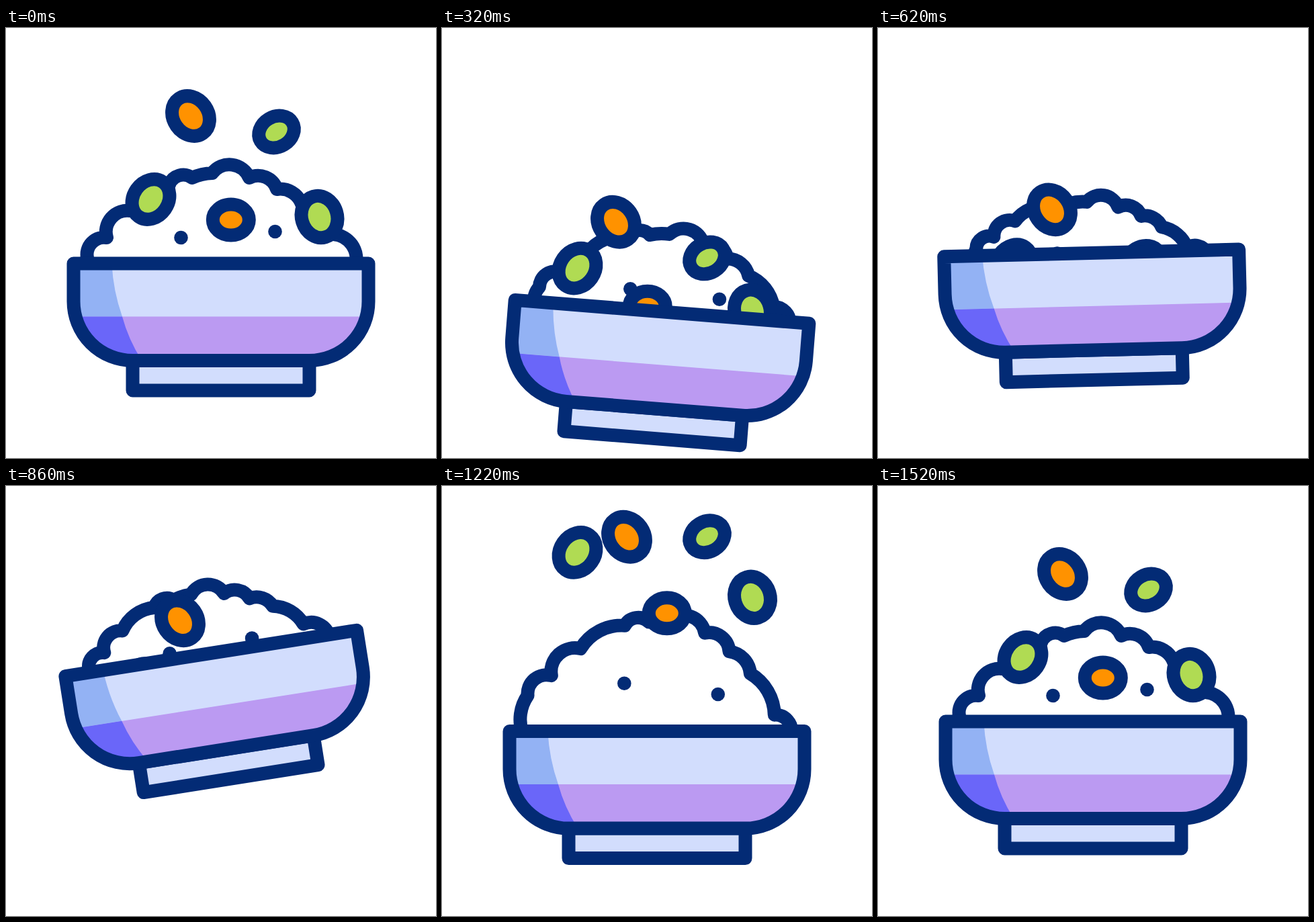
An HTML page that plays this animation: 640x640 px, repeating every 1.7 s.

```html
<!DOCTYPE html>
<html lang="en">
<head>
<meta charset="utf-8">
<title>Rice bowl</title>
<style>
  html, body { margin: 0; width: 100%; height: 100%; overflow: hidden; background: #fff; }
  svg { display: block; width: 100vw; height: 100vh; }
  .line { stroke: #032b75; stroke-width: 20; stroke-linejoin: round; stroke-linecap: round; }
</style>
</head>
<body>
<svg viewBox="0 0 640 640">
  <defs>
    <path id="body" d="M100.5 350.5H539.5V407A88 88 0 0 1 451.5 495H188.5A88 88 0 0 1 100.5 407Z"/>
    <clipPath id="inside"><use href="#body"/></clipPath>
  </defs>
  <path id="rice" class="line" fill="#fff"/>
  <g id="bits"></g>
  <g id="bowl">
    <path class="line" fill="#d2ddfd" d="M188.5 495H451.5V539.5H188.5Z"/>
    <g clip-path="url(#inside)">
      <path fill="#d2ddfd" d="M90 340H550V505H90Z"/>
      <path fill="#bb9af2" d="M90 429.5H550V505H90Z"/>
      <path fill="#93b2f4" d="M90 340H157Q158 387 173 429.5H90Z"/>
      <path fill="#6a66f9" d="M90 429.5H173Q182 463 202 495H90Z"/>
    </g>
    <use href="#body" class="line" fill="none"/>
  </g>
</svg>
<script>
const LOOP = 1700, END = 1520, CX = 320, RIM = 350, PIVOT = 445.5;
const $ = id => document.getElementById(id);

// Monotone cubic track through (times, values): flat at turning points.
function track(times, values) {
  const step = times.slice(1).map((t, i) => (values[i + 1] - values[i]) / (t - times[i]));
  const slope = values.map((_, i) => {
    const a = step[i - 1], b = step[i];
    return a * b > 0 ? 2 * a * b / (a + b) : 0;
  });
  const last = times.length - 1;
  return t => {
    if (t >= times[last]) return values[last];
    let i = 0;
    while (t >= times[i + 1]) i++;
    const h = times[i + 1] - times[i], u = (t - times[i]) / h, v = 1 - u;
    return v * v * ((1 + 2 * u) * values[i] + u * h * slope[i]) +
           u * u * ((3 - 2 * u) * values[i + 1] - v * h * slope[i + 1]);
  };
}

function spin(x, y, deg) {
  const a = deg * Math.PI / 180, c = Math.cos(a), s = Math.sin(a);
  return [x * c - y * s, x * s + y * c];
}

// Bowl
const lift = track([0, 365, 450, 800, 1172, 1380], [0, 74.5, 74.5, -112, 17, 0]);
const tilt = track([0, 420, 476, 800, 1045], [0, 5.3, 5.3, -10.6, 0]);

// Rice heap: squashed and leaning as a whole
const POSES = [0, 320, 620, 860, 1020, 1220, END];
const squash = track(POSES, [1, 0.88, 0.64, 0.72, 1.07, 1.19, 1]);
const lean = track(POSES, [0, 10, 4, -7.5, 2, 11, 0]);
const width = t => Math.min(1, 1 - 0.4 * (1 - squash(t)));

function onHeap(x, y, t) {
  const [dx, dy] = spin((x - CX) * width(t), (y - RIM - 30) * squash(t) + 30, lean(t));
  return [CX + 2.4 * tilt(t) + dx, RIM + lift(t) + dy];
}

function onRim(side, t) {
  const [dx, dy] = spin(side * 200 * width(t), RIM + 4 - PIVOT, tilt(t));
  return [CX + dx, PIVOT + lift(t) + dy];
}

// Notches between bumps: x, y and how far the bump before them swells
const notches = [
  [121, 342, .12], [150, 312, .26], [185, 272, .27], [243, 233, .14], [277, 223, .25],
  [307, 216, .05], [362, 223, .29], [403, 240, .23], [440, 262, .18], [487, 307, .13]
];

function ricePath(t) {
  let [px, py] = onRim(-1, t);
  let d = `M${px} ${py}`;
  const bump = ([x, y], k) => {
    const r = Math.hypot(x - px, y - py) * (1 / (8 * k) + k / 2);
    d += `A${r} ${r} 0 0 1 ${x} ${y}`;
    [px, py] = [x, y];
  };
  for (const [x, y, k] of notches) bump(onHeap(x, y, t), k);
  bump(onRim(1, t), .24);
  return d;
}

// Beans sink into the bowl, then get tossed up
const sink = track([0, 320, 620, 860, 1020, 1130], [0, .5, .9, 1, .2, 0]);
const toss = track([0, 860, 1020, 1130, 1220, END], [0, 0, .66, 1.1, 1, 0]);

function bean({ x, y, drift, back, drop, rise, cling = 1 }) {
  const sway = track([0, 320, back, back + 300], [0, drift, drift, 0]);
  return t => [x + sway(t), y + lift(t) + drop * sink(t) ** cling - rise * toss(t)];
}

// Dots ride the heap and settle a little deeper
const dot = (x, y) => t => {
  const [hx, hy] = onHeap(x, y, t);
  return [hx, hy + 50 * (1 - squash(t))];
};

const bits = [];
function add(rx, ry, angle, fill, at) {
  const el = document.createElementNS('http://www.w3.org/2000/svg', 'ellipse');
  el.setAttribute('rx', rx);
  el.setAttribute('ry', ry);
  if (fill) {
    el.setAttribute('class', 'line');
    el.setAttribute('fill', fill);
  } else {
    el.setAttribute('fill', '#032b75');
  }
  $('bits').append(el);
  bits.push({ el, angle, at });
}

const ORANGE = '#ff9200', GREEN = '#b0db53';
add(10.3, 10.3, 0, null, dot(260.5, 312));
add(10.3, 10.3, 0, null, dot(400.5, 303));
add(27, 23, 0, ORANGE, bean({ x: 334.8, y: 285.5, drift: -29, back: 860, drop: 115, rise: 111 }));
add(26, 31.5, 35, GREEN, bean({ x: 215.5, y: 255, drift: -14, back: 1220, drop: 142, rise: 171, cling: 2.2 }));
add(26.5, 31.5, -17, GREEN, bean({ x: 466.5, y: 281, drift: -4.5, back: 1220, drop: 136, rise: 130 }));
add(27.5, 22.5, -31, GREEN, bean({ x: 402.5, y: 154.5, drift: -8, back: 1220, drop: 232, rise: 94 }));
add(26, 31.5, -35, ORANGE, bean({ x: 275, y: 131, drift: -16, back: 860, drop: 172, rise: 70 }));

function draw(t) {
  $('bowl').setAttribute('transform', `translate(0 ${lift(t)}) rotate(${tilt(t)} ${CX} ${PIVOT})`);
  $('rice').setAttribute('d', ricePath(t));
  for (const { el, angle, at } of bits) {
    el.setAttribute('transform', `translate(${at(t)}) rotate(${angle})`);
  }
}

const start = performance.now();
function tick() {
  draw((performance.now() - start) % LOOP);
  requestAnimationFrame(tick);
}
tick();
</script>
</body>
</html>
```
